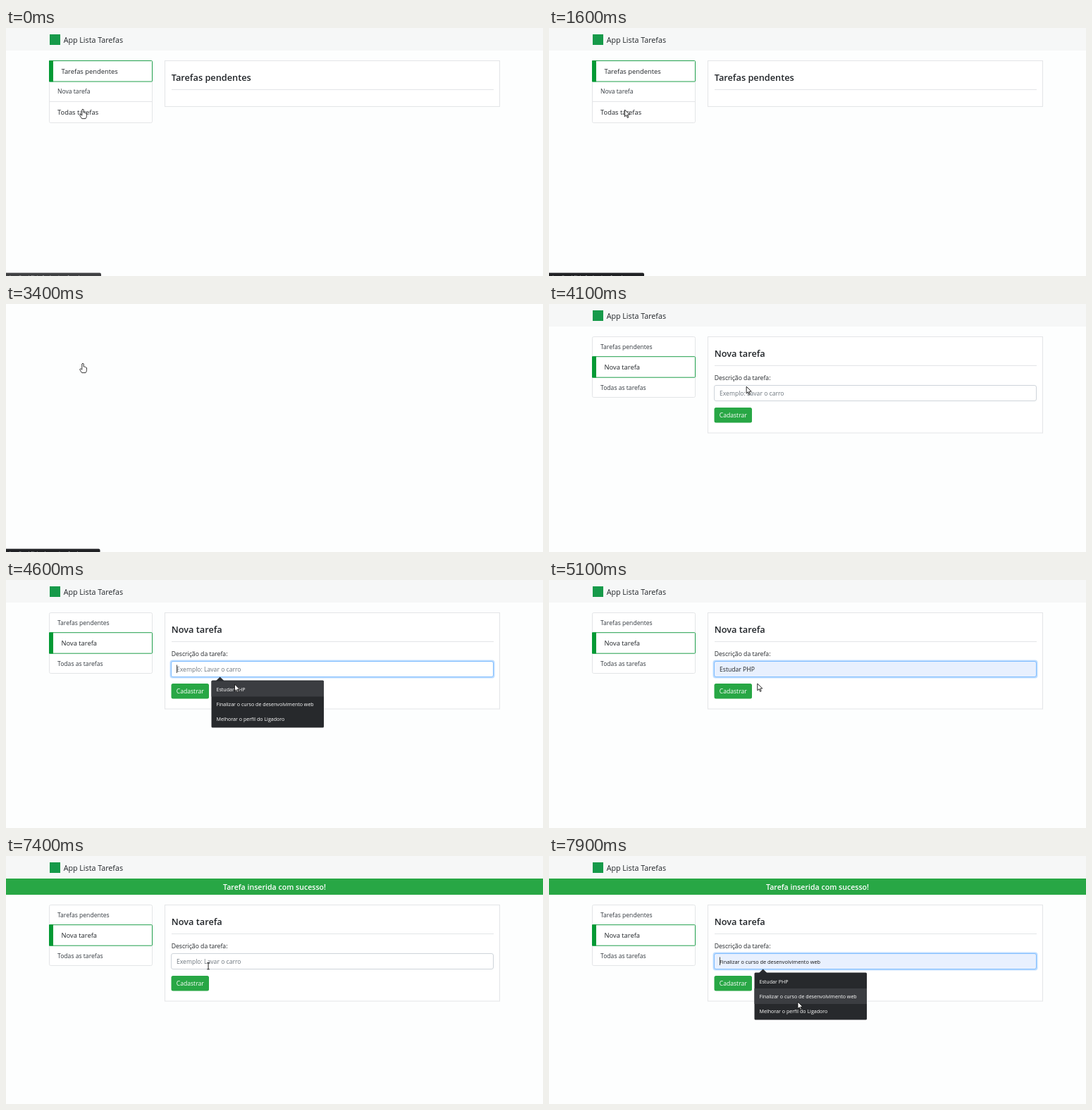
An HTML page for the animation above (8 s loop, 762x352 px).

```html
<!DOCTYPE html>
<html lang="pt-BR">
<head>
<meta charset="utf-8">
<title>App Lista Tarefas</title>
<style>
html, body { margin: 0; width: 100%; height: 100%; overflow: hidden; background: #fdfefe; }
svg { display: block; width: 762px; height: 352px; font-family: "Open Sans", "Noto Sans", sans-serif; }
</style>
</head>
<body>
<svg id="stage" viewBox="0 0 762 352"></svg>
<script>
const LOOP = 8000, STEP = 100;
const INK = '#212529', GREEN = '#049a35', BUTTON = '#28a745', LINE = '#e3e5e7';
const HINTS = ['Estudar PHP', 'Finalizar o curso de desenvolvimento web', 'Melhorar o perfil do Ligadoro'];

// Pointer keys: time, x, y, shape held until the next key
const POINTER = [
  [0, 109, 115, 'hand'], [1600, 107.5, 116, 'arrow'], [2400, 107.5, 116, 'arrow'],
  [2600, 109, 84, 'hand'], [3700, 109, 84, 'arrow'], [4200, 300, 121, 'beam'],
  [4500, 304, 123, 'arrow'], [4600, 324.5, 148, 'arrow'], [4900, 324.5, 148, 'arrow'],
  [5300, 267, 146, 'hand'], [6000, 265.5, 144.5, 'arrow'], [6900, 265.5, 144.5, 'arrow'],
  [7300, 286, 151, 'beam'], [7600, 290, 152, 'arrow'], [7700, 318, 176, 'arrow'],
  [7900, 353, 207, 'arrow'], [8000, 353, 207, 'arrow']
];
const SHAPES = {
  arrow: '<path d="M0 0V9.8L2.3 7.7L3.9 11.4L5.4 10.7L3.8 7.2L7 7Z" fill="#fff" stroke="#111" stroke-width=".9"/>',
  hand: '<path d="M-1.2 1Q0-.8 1.2 1V5Q2.2 4.3 2.8 5.4Q3.9 4.9 4.3 6Q5.4 5.8 5.5 7V9.5Q5.4 12 4 13.6H-1.4L-4.2 9.3Q-4.2 7.5-2.6 8L-1.2 9.2Z" fill="#fff" stroke="#222" stroke-width=".9"/>',
  beam: '<path d="M-1.7 .5H1.7M0 .5V9.5M-1.7 9.5H1.7" fill="none" stroke="#222"/>'
};

const text = (s, x, y, size, fill = INK, extra = '') =>
  `<text x="${x}" y="${y}" font-size="${size}" fill="${fill}" ${extra}>${s}</text>`;
const rect = (x, y, w, h, fill, extra = '') =>
  `<rect x="${x}" y="${y}" width="${w}" height="${h}" fill="${fill}" ${extra}/>`;
const box = (x, y, w, h, stroke = LINE, r = 0, fill = '#fff') =>
  rect(x, y, w, h, fill, `stroke="${stroke}" rx="${r}"`);
const rule = (x1, x2, y) => `<path d="M${x1} ${y}H${x2}" stroke="${LINE}"/>`;

function header() {
  return rect(0, 0, 762, 32, '#f6f7f7') + rect(62, 9, 15, 15, '#169a4a')
    + text('App Lista Tarefas', 81.7, 20.7, 10.7);
}

function menu(labels, active, hover) {
  let y = 46.5, rows = '';
  labels.forEach((label, i) => {
    const on = i === active, big = on || i === hover, h = big ? 29.5 : 28.2;
    if (on) rows += box(61.5, y, 146, h, '#1f9f4b', 1) + rect(61, y - .3, 6, h + .6, GREEN);
    else if (i && i - 1 !== active) rows += rule(61, 208, Math.floor(y) + .5);
    rows += text(label, on ? 78.5 : 73, y + h / 2 + (big ? 3.8 : 3.3), big ? 9.35 : 8.6, big ? INK : '#343a40');
    y += h;
  });
  return box(61.5, 46.5, 146, Math.round(y) - 46, LINE, 2) + rows;
}

function panel(title, h) {
  return box(225.5, 46.5, 475, h) + text(title, 234.7, 75.4, 12.75, INK, 'font-weight="600"') + rule(235, 692, 87.5);
}

function hints(hover) {
  return '<path d="M298 143L303.7 137.6L309.4 143Z" fill="#292b2e"/>'
    + rect(291.5, 142.5, 159.5, 67, '#27292c', 'rx="1.5"')
    + (hover < 0 ? '' : rect(291.5, 143.5 + hover * 21.5, 159.5, 22, '#3b3d41'))
    + HINTS.map((s, i) => text(s, 298.5, 158.1 + i * 20.8, 7.1, '#fff')).join('');
}

function form({ value, preview, focus, pressed, open, hover }) {
  let out = text('Descrição da tarefa:', 234.7, 107.5, 8.63);
  if (focus) out += rect(232.5, 113.5, 461, 26, '#bfdeff', 'rx="4"');
  out += box(234.5, 115.5, 457, 22, focus ? '#80bdff' : '#ced4da', 2.5, value || preview ? '#e8f0fe' : '#fff');
  if (value) out += text(value, 242, 130, 8.63);
  else if (preview) out += text(preview, 242, 129.8, 7.35, '#111');
  else out += text('Exemplo: Lavar o carro', 242, 130, 8.61, '#6c757d');
  if (focus && !value) out += rect(242, 120.5, 1, 11.5, '#444');
  if (pressed) out += rect(233, 145, 57, 25, '#93d3a2', 'rx="4"');
  out += rect(234.5, 147, 53.5, 21.5, pressed ? '#23a044' : BUTTON, 'rx="2.5"')
    + text('Cadastrar', 241.7, 161, 8.65, '#fff');
  return out + (open ? hints(hover) : '');
}

function status(t) {
  const next = t >= 3000, page = next ? 'listas/nova_tarefa' : 'lista/todas_tarefas';
  return `<g opacity="${Math.min(1, .86 + t / 3500)}">`
    + rect(-3, 347.5, next ? 136.5 : 138, 9, '#202124', 'rx="2"')
    + text(`localhost/${page}.php`, 5, 356, 7, '#c4c7ca') + '</g>';
}

function pending(t) {
  return header() + menu(['Tarefas pendentes', 'Nova tarefa', 'Todas tarefas'], 0, t < 2500 ? 2 : 1)
    + panel('Tarefas pendentes', 65);
}

function create(state) {
  return menu(['Tarefas pendentes', 'Nova tarefa', 'Todas as tarefas'], 1)
    + panel('Nova tarefa', 136.5) + form(state);
}

function firstForm(t) {
  return header() + create({
    focus: t >= 4400 && t < 5600,
    open: t >= 4500 && t < 4900,
    hover: t >= 4600 ? 0 : -1,
    preview: t >= 4700 && HINTS[0],
    value: t >= 4900 && HINTS[0],
    pressed: t >= 5600
  });
}

function secondForm(t) {
  const hover = t < 7700 ? -1 : t < 7800 ? 0 : 1;
  return header() + rect(0, 32, 762, 23, BUTTON)
    + text('Tarefa inserida com sucesso!', 381, 48, 10.6, '#fff', 'font-weight="600" text-anchor="middle"')
    + '<g transform="translate(0 23)">'
    + create({ focus: t >= 7500, open: t >= 7600, hover, preview: HINTS[hover] }) + '</g>';
}

function pointer(t) {
  const i = POINTER.findIndex(k => k[0] > t) - 1;
  const [t0, x0, y0, shape] = POINTER[i], [t1, x1, y1] = POINTER[i + 1];
  // Shape changes in place jump; longer moves glide
  const glide = Math.hypot(x1 - x0, y1 - y0) > 3;
  const p = glide ? (t - t0) / (t1 - t0) : 0, e = p * p * (3 - 2 * p);
  return `<g transform="translate(${x0 + (x1 - x0) * e} ${y0 + (y1 - y0) * e})">${SHAPES[shape]}</g>`;
}

function scene(t) {
  let page = '';
  if (t < 3400) page = pending(t);
  else if (t >= 3700 && t < 6600) page = firstForm(t);
  else if (t >= 6800) page = secondForm(t);
  return page + (t < 3700 ? status(t) : '') + pointer(t);
}

const stage = document.getElementById('stage'), start = performance.now();
let last = -1;
function draw() {
  const t = Math.floor((performance.now() - start) % LOOP / STEP) * STEP;
  if (t !== last) stage.innerHTML = scene(last = t);
  requestAnimationFrame(draw);
}
draw();
</script>
</body>
</html>
```
